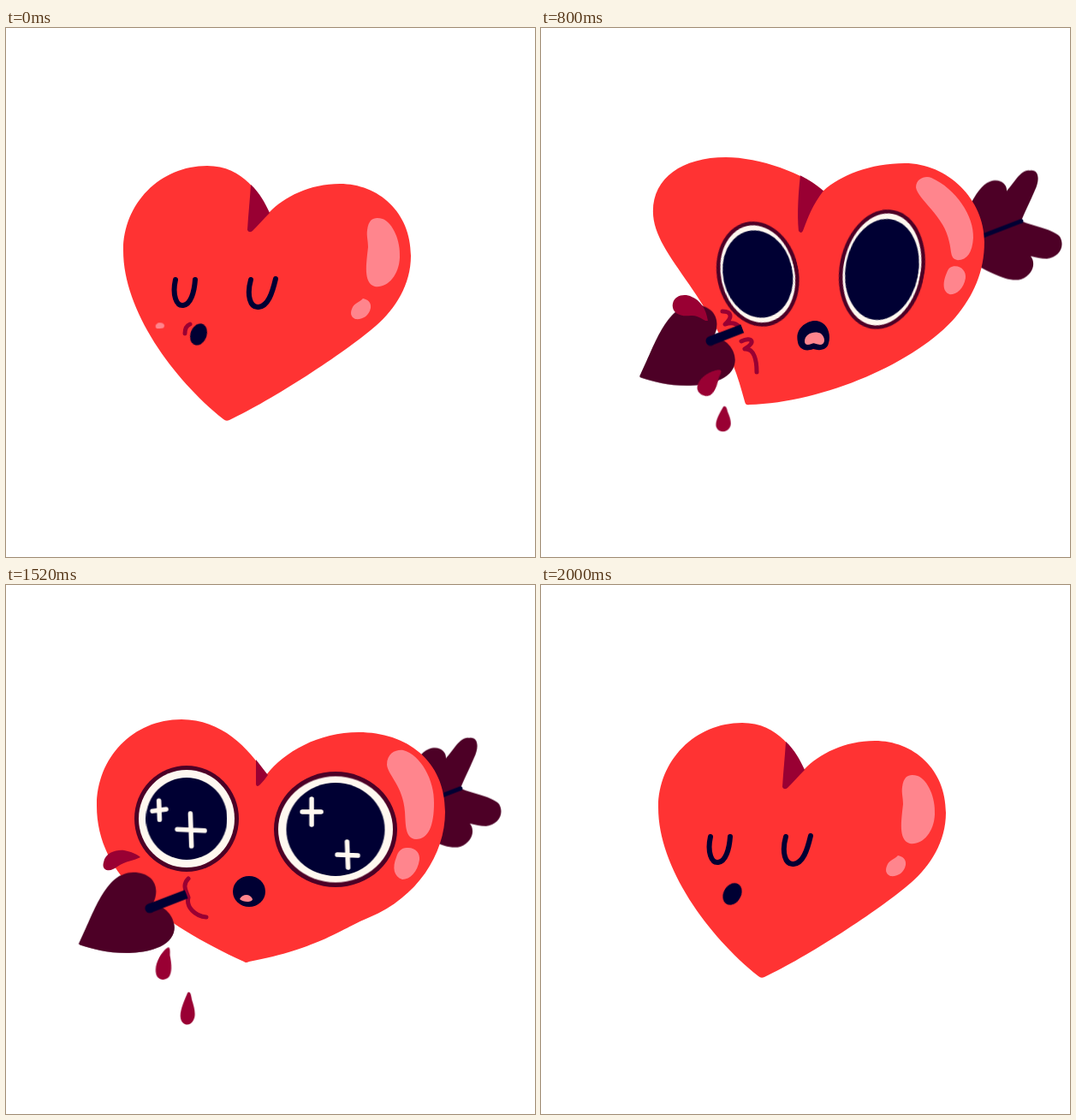
These frames come from a looping animation (618x618 px, 2.08 s). An HTML page:

```html
<!DOCTYPE html>
<html lang="en">
<head>
<meta charset="utf-8">
<title>Heart and arrow</title>
<style>
html, body { margin: 0; width: 100%; height: 100%; overflow: hidden; background: #fff; }
svg { display: block; width: 100vw; height: 100vh; }
svg * { animation: 2080ms linear infinite; }

.red { fill: #f33; }
.pink { fill: #ff858d; }
.wine { fill: #4d0026; }
.blood { fill: #903; }
.ink { fill: #003; }
.cream { fill: #fff8f0; }
.line { fill: none; stroke-width: 6; stroke-linecap: round; stroke-linejoin: round; }
.lid { stroke: #003; }
.crease { stroke: #903; stroke-width: 5; }

/* when each face is on */
.sleep { animation-name: sleep; animation-timing-function: step-end; }
.awake { animation-name: awake; animation-timing-function: step-end; }
.hit { animation-name: hit; animation-timing-function: step-end; }
.love { animation-name: love; animation-timing-function: step-end; }
.leave { animation-name: leave; animation-timing-function: step-end; }
.bleed { animation-name: bleed; animation-timing-function: step-end; }
.tune { animation-name: tune; animation-timing-function: step-end; }
@keyframes sleep { 0% { opacity: 1 } 36.538% { opacity: 0 } 86.538%, 100% { opacity: 1 } }
@keyframes awake { 0% { opacity: 0 } 36.538% { opacity: 1 } 86.538%, 100% { opacity: 0 } }
@keyframes hit { 0% { opacity: 0 } 36.538% { opacity: 1 } 42.308%, 100% { opacity: 0 } }
@keyframes love { 0% { opacity: 0 } 42.308% { opacity: 1 } 78.846%, 100% { opacity: 0 } }
@keyframes leave { 0% { opacity: 0 } 78.846% { opacity: 1 } 86.538%, 100% { opacity: 0 } }
@keyframes bleed { 0% { opacity: 0 } 36.538% { opacity: 1 } 84.615%, 100% { opacity: 0 } }
@keyframes tune { 0% { opacity: 1 } 34.615%, 100% { opacity: 0 } }

/* body */
.body { transform-origin: 257px 459px; animation-name: stretch; }
@keyframes stretch {
  0%, 82.692% { transform: none }
  88.462% { transform: scale(.96, 1.094) }
  92.308% { transform: scale(1.02, .985) }
  96.154%, 100% { transform: none }
}
.heart { animation-name: heart; }
@keyframes heart {
  0%, 32.692%, 88.462%, 100% { d: path("M307,216C298,196 278,161 235,161C180,161 137,205 137,260C137,330 195,410 254,457Q257,460 261,458C310,435 395,380 432,348C455,328 473,300 473,266C473,215 435,182 390,182C355,182 325,197 307,216Z") }
  38.462% { animation-timing-function: ease-out; d: path("M330,190C308,170 255,151 216,151C165,151 131,175 131,214C131,268 208,313 238,437Q239,441 243,440C330,438 440,390 485,337C505,313 518,285 518,250C518,200 475,158 425,158C385,158 350,172 330,190Z") }
  46.154%, 76.923% { d: path("M304,222C283,190 252,157 205,157C148,157 106,202 106,258C106,340 180,395 278,440Q280,442 284,440C365,425 395,400 425,388C480,365 513,315 513,265C513,205 468,172 412,172C365,172 325,195 304,222Z") }
  80.769%, 82.692% { d: path("M295,241C270,205 230,176 185,176C130,176 88,214 88,265C88,345 170,400 259,447Q262,449 267,446C340,428 385,408 418,391C480,358 515,318 515,276C515,222 465,191 410,191C365,191 322,213 295,241Z") }
}
.fold { animation-name: fold; }
@keyframes fold {
  0%, 32.692%, 88.462%, 100% { d: path("M286,183C296,192 303,205 308,216C301,223 295,230 288,237Q284,240 282,236C283,218 285,200 286,183Z") }
  38.462% { animation-timing-function: ease-out; d: path("M303,172C313,177 322,183 330,190C317,207 312,221 306,237Q304,241 301,237C299,215 301,190 303,172Z") }
  46.154%, 76.923% { d: path("M292,204C297,210 302,217 306,222C303,226 300,230 297,233Q293,237 292,233C292,223 292,213 292,204Z") }
  80.769%, 82.692% { d: path("M276,218C283,225 290,233 295,241C291,246 287,250 283,253Q278,256 277,251C278,240 277,229 276,218Z") }
}
.shine { animation-name: shine; }
@keyframes shine {
  0%, 32.692%, 88.462%, 100% { d: path("M422,236C424,221 432,221 440,223C452,228 461,248 460,268C459,290 445,304 431,302C417,298 421,275 423,256C423,248 421,243 422,236Z") }
  38.462% { animation-timing-function: ease-out; d: path("M438,186C438,175 450,172 456,175C485,188 506,220 505,245C504,262 498,271 487,271C478,270 480,262 477,250C472,220 440,200 438,186Z") }
  46.154%, 76.923% { d: path("M445,210C445,196 456,192 464,193C484,198 501,228 500,255C500,280 494,297 479,297C466,296 467,280 466,265C464,235 446,222 445,210Z") }
  80.769%, 82.692% { d: path("M438,226C440,215 452,214 462,215C485,220 505,250 504,277C503,298 497,309 484,309C470,307 473,295 470,280C465,250 437,242 438,226Z") }
}
.spot { animation-name: spot; }
@keyframes spot {
  0%, 32.692%, 88.462%, 100% { d: path("M417,316C422,317 427,320 426,327C424,337 416,341 408,340C402,337 402,332 405,326C408,321 412,321 417,316Z") }
  38.462% { animation-timing-function: ease-out; d: path("M484,278C492,278 497,285 496,292C494,304 486,311 478,311C468,308 470,295 474,286C476,280 479,278 484,278Z") }
  46.154%, 76.923% { d: path("M468,307C478,306 484,313 483,321C481,335 472,344 463,344C453,341 451,330 456,318C458,311 462,307 468,307Z") }
  80.769%, 82.692% { d: path("M468,318C477,318 482,324 480,332C476,344 467,350 459,349C449,347 449,338 452,330C456,321 461,318 468,318Z") }
}

/* whistling */
.lips { animation-name: lips; }
@keyframes lips {
  0% { transform: translate(225px, 358px) rotate(20deg) scale(.95, 1) }
  15.385% { transform: translate(225px, 350px) rotate(50deg) scale(.9, 1.08) }
  17.308% { transform: translate(225px, 358px) rotate(20deg) scale(.95, 1) }
  32.692%, 36% { transform: translate(225px, 350px) rotate(50deg) scale(.9, 1.08) }
  86%, 100% { transform: translate(223.5px, 361px) rotate(30deg) scale(1.02, 1.04) }
}
.pucker { animation-name: pucker; }
@keyframes pucker {
  0%, 17.308% { opacity: 1; d: path("M215,346C210,348 209,352 209,357") }
  15.385%, 32.692% { opacity: 1; d: path("M208,357C206,365 209,370 214,374") }
  36%, 100% { opacity: 0; d: path("M208,357C206,365 209,370 214,374") }
}
.note { stroke: #ff858d; vector-effect: non-scaling-stroke; animation-name: note; }
.note + .note { animation-delay: -1720ms; }
@keyframes note {
  0% { opacity: 1; transform: translate(180px, 348px) scale(.13, .03) }
  3.846% { transform: translate(155px, 325px) scale(.4) }
  9.615% { transform: translate(123px, 275px) scale(.85) }
  15.385% { transform: translate(113px, 245px) }
  21.154% { opacity: 1; transform: translate(123px, 182px) scale(.9) }
  21.2%, 100% { opacity: 0; transform: translate(123px, 182px) scale(.9) }
}

/* eyes: --a struck, --b charmed, --c let go */
.eye { animation-name: look; }
@keyframes look {
  0%, 38.462% { transform: translate(var(--a)) rotate(var(--tilt)); animation-timing-function: ease-out }
  46.154%, 76.923% { transform: translate(var(--b)) rotate(0deg) }
  80.769%, 100% { transform: translate(var(--c)) rotate(0deg) }
}
.eye circle { animation-name: size; }
@keyframes size {
  0%, 38.462% { transform: scale(var(--a)); animation-timing-function: ease-out }
  46.154%, 76.923% { transform: scale(var(--b)) }
  80.769%, 100% { transform: scale(var(--c)) }
}
.star { stroke: #fff8f0; stroke-width: 5.5; vector-effect: non-scaling-stroke; animation-name: star; }
@keyframes star {
  0%, 42.308% { opacity: 0; transform: translate(var(--p)) scale(0) }
  44.231% { opacity: 1 }
  48.077% { transform: translate(var(--p)) scale(var(--a)) }
  63.462%, 76.923% { transform: translate(var(--p)) scale(var(--b)) }
  80.769%, 100% { opacity: 1; transform: translate(var(--q)) scale(var(--c)) }
}

/* arrow, placed by the joint of its feathers */
.arrow { animation-name: fly; }
@keyframes fly {
  0%, 26.923% { transform: translate(1163px, 1px) }
  32.692% { transform: translate(848px, 118px) }
  36.538% { transform: translate(623px, 202px) }
  38.462% { transform: translate(561px, 225.5px) }
  48.077% { transform: translate(543px, 232px) }
  63.462% { transform: translate(535px, 236px) }
  75% { transform: translate(530px, 238px); animation-timing-function: cubic-bezier(.5, 0, .9, .7) }
  80.769% { transform: translate(115px, 396px) }
  84.615%, 100% { transform: translate(-280px, 548px) }
}
.shaft { animation-name: sway; }
@keyframes sway {
  0%, 75% { transform: rotate(0deg) }
  80.769%, 100% { transform: rotate(-3.6deg) }
}
.tip { animation-name: tip; }
@keyframes tip {
  0%, 32.692% { transform: translate(-363px, 140px) scale(1.25, 1.07) }
  38.462%, 100% { transform: translate(-363px, 140px) }
}
.feather { animation-name: feather; }
@keyframes feather {
  0%, 75% { d: path("M-85,33C-68,0 -54,-40 -37,-46C-25,-51 -16,-43 -17,-35C-8,-45 0,-61 10,-59C21,-61 22,-48 16,-36C10,-22 3,-8 0,0C15,6 38,10 45,18C52,30 44,42 30,44C23,44 17,42 11,41C17,48 15,62 0,68C-15,72 -35,62 -85,33Z") }
  80.769%, 100% { d: path("M-93,44C-66,14 -34,-44 -8,-59C4,-67 18,-72 26,-62C34,-68 42,-78 55,-76C66,-74 64,-62 58,-54C45,-38 22,-16 8,-3C30,-6 75,-12 94,-5C108,2 106,14 90,16C82,17 74,16 69,17C76,20 76,30 62,36C40,44 -10,44 -93,44Z") }
}
.wound { animation-name: wound; }
@keyframes wound {
  0%, 38.462% { transform: translate(236px, 353px) rotate(-21deg) }
  48.077% { transform: translate(215px, 361px) rotate(-21deg) }
  63.462%, 76.923% { transform: translate(211px, 362px) rotate(-21deg) }
  80.769%, 100% { transform: translate(242px, 353px) rotate(-21deg) }
}

/* blood */
.splash { animation-name: splash; }
@keyframes splash {
  0%, 38.462% { opacity: 1; d: path("M154,322C156,312 168,310 176,314C186,318 193,328 195,342C190,343 185,335 175,336C162,338 152,332 154,322Z") }
  48.077% { d: path("M138,322C140,312 152,309 160,312C168,315 175,318 183,322C178,328 170,327 160,329C148,333 136,332 138,322Z") }
  63.462%, 76.9% { opacity: 1; d: path("M114,324C116,312 130,309 138,310C147,312 152,314 157,318C150,322 140,322 130,329C122,336 111,334 114,324Z") }
  76.923%, 100% { opacity: 0; d: path("M114,324C116,312 130,309 138,310C147,312 152,314 157,318C150,322 140,322 130,329C122,336 111,334 114,324Z") }
}
.drip { animation-name: drip; }
@keyframes drip {
  0%, 38.462% { transform: translate(197px, 413px) rotate(27deg) scale(1.25, 1.1) }
  48.077% { transform: translate(191px, 422px) rotate(10deg) scale(1.05, 1) }
  63.462% { transform: translate(188px, 437px) rotate(2deg) scale(1.08, 1.16) }
  75% { transform: translate(184px, 443px) rotate(2deg) scale(1.1, 1.18) }
  80.769%, 100% { transform: translate(61px, 475px) rotate(0deg) scale(1.4, 1.58) }
}
.drop { animation-name: drop; }
@keyframes drop {
  0%, 38.462% { transform: translate(213px, 457px) rotate(0deg) scale(1.03, .92) }
  48.077% { transform: translate(212px, 475px) rotate(4deg) scale(.92, 1.02) }
  55.769% { transform: translate(213px, 485px) rotate(1deg) scale(.98, 1.1) }
  63.462% { transform: translate(213px, 490px) rotate(0deg) scale(1, 1.15) }
  75% { transform: translate(212px, 496px) rotate(0deg) scale(1, 1.18) }
  80.769%, 100% { transform: translate(181px, 556px) rotate(5deg) scale(1.1, 1.45) }
}
</style>
</head>
<body>
<svg viewBox="0 0 618 618">
  <defs>
    <clipPath id="cut"><rect class="wound" x="-900" y="-900" width="900" height="1800"/></clipPath>
  </defs>

  <g class="arrow">
    <path class="feather wine"/>
    <g class="shaft">
      <path class="tip wine" d="M-82,40C-66,8 -52,-42 -19,-42C4,-42 14,-24 3,-4C20,-4 32,14 28,28C22,48 -10,52 -27,52C-50,52 -68,47 -80,43Q-84,42 -82,40Z"/>
      <path class="ink" d="M-361,145L-216,88.5L-126,51.5L1,2.3L-1,-2.3L-128,46.5L-220,79.5L-365,135Z"/>
      <circle class="ink" cx="-363" cy="140" r="5.5"/>
      <circle class="ink" r="2.5"/>
    </g>
  </g>

  <g class="body">
    <path class="heart red"/>
    <path class="fold blood"/>
    <path class="shine pink"/>
    <path class="spot pink"/>

    <g class="sleep">
      <path class="line lid" d="M198,294C194,312 199,325 207,324C216,323 220,308 221,294M286,294C281,312 285,327 295,326C306,325 311,310 315,293"/>
      <path class="pucker line crease"/>
      <ellipse class="lips ink" rx="10" ry="13"/>
    </g>

    <g class="awake">
      <g class="eye" style="--a:253.5px,287.5px;--b:211px,273px;--c:206px,298px;--tilt:-13deg">
        <circle class="wine" r="1" style="--a:47.5,62;--b:61,62;--c:63.5,57"/>
        <circle class="cream" r="1" style="--a:43,57.5;--b:56,57;--c:59,52"/>
        <circle class="ink" r="1" style="--a:40.5,51.5;--b:47.5,48;--c:55,48"/>
      </g>
      <g class="eye" style="--a:398.5px,282px;--b:385px,285.5px;--c:377px,309px;--tilt:11deg">
        <circle class="wine" r="1" style="--a:49.5,70.5;--b:72,67.5;--c:75,62"/>
        <circle class="cream" r="1" style="--a:45,66;--b:67,62;--c:70,57"/>
        <circle class="ink" r="1" style="--a:42.5,59.5;--b:57.5,54.5;--c:64.5,53.5"/>
      </g>
      <path class="star line" d="M-.5,-10L.5,10M-10,1L10,-1" style="--p:179px,263px;--q:166px,285px;--a:.5,.7;--b:.8,1.1;--c:.32"/>
      <path class="star line" d="M-.4,-10L.4,10M-10,-.3L10,.5" style="--p:216px,286px;--q:206px,300px;--a:.7;--b:1.6,1.9;--c:1.1,1"/>
      <path class="star line" d="M0,-10L0,10M-10,0L10,0" style="--p:357px,265px;--q:365px,286px;--a:.9,1;--b:1.1,1.5;--c:.5,.3"/>
      <path class="star line" d="M-.5,-10L.5,10M-10,0L10,.7" style="--p:399px,315px;--q:412.5px,325px;--a:.4;--b:1.2,1.5;--c:1.1,.9"/>
    </g>

    <g class="hit">
      <path class="line crease" d="M212,331C223,331 224,338 215,346C225,343 232,346 233,354M234,366C246,360 252,367 238,375C249,374 252,388 252,402"/>
      <path class="ink" d="M300,367C296,350 312,341 322,342C335,344 339,358 336,368C335,375 327,378 318,375C308,379 301,374 300,367Z"/>
      <path class="pink" d="M308,366C308,357 320,353 327,357C333,362 332,370 326,370C320,369 319,367 316,369C311,371 308,370 308,366Z"/>
    </g>
    <g class="love">
      <path class="line crease" d="M213,343C205,351 211,358 213,365C210,376 221,387 234,388"/>
      <ellipse class="ink" cx="284" cy="358" rx="19" ry="18"/>
      <path class="pink" d="M273,367C276,361 285,360 288,367C288,371 277,371 273,367Z"/>
    </g>
    <g class="leave">
      <path class="line crease" d="M205,359C222,361 222,365 211,371C224,371 224,375 219,381C227,383 228,388 227,395"/>
      <path class="ink" d="M253,382C253,370 266,366 277,366C290,366 299,373 299,383C299,391 292,393 284,392C277,389 270,392 264,392C257,391 253,388 253,382Z"/>
      <path class="pink" d="M259,385C263,376 288,375 292,384C290,389 282,385 276,385C268,387 263,390 259,385Z"/>
    </g>
  </g>

  <g class="tune">
    <path class="note line" d="M-16,17C-10,18 -6,15 -4,14C-4,4 -5,-6 -8,-16C4,-12 18,-12 16,-1C15,4 9,6 7,6"/>
    <path class="note line" d="M-16,17C-10,18 -6,15 -4,14C-4,4 -5,-6 -8,-16C4,-12 18,-12 16,-1C15,4 9,6 7,6"/>
  </g>

  <g id="front" clip-path="url(#cut)"></g>

  <g class="bleed">
    <path class="splash blood"/>
    <path class="drip blood" d="M4,-16C6,-16 6,-12 6,-8C8,0 9,8 6,13C2,18 -6,17 -8,11C-11,2 -4,-10 2,-15Z"/>
    <path class="drop blood" d="M0,-16C3,-18 4,-14 5,-9C8,-1 10,6 7,11C3,18 -6,17 -8,10C-10,3 -4,-8 0,-16Z"/>
  </g>
</svg>
<script>
const LOOP = 2080, STEP = 40;

// The part of the arrow that has left the heart is drawn again on top.
document.getElementById('front').append(document.querySelector('.arrow').cloneNode(true));

// Hold the CSS motion at 25 pictures a second.
const parts = document.getAnimations();
parts.forEach(part => part.pause());
const start = performance.now();

function draw() {
  const time = (performance.now() - start) % LOOP;
  const held = Math.floor(time / STEP) * STEP + 0.5;
  parts.forEach(part => { part.currentTime = held; });
  requestAnimationFrame(draw);
}
draw();
</script>
</body>
</html>
```
